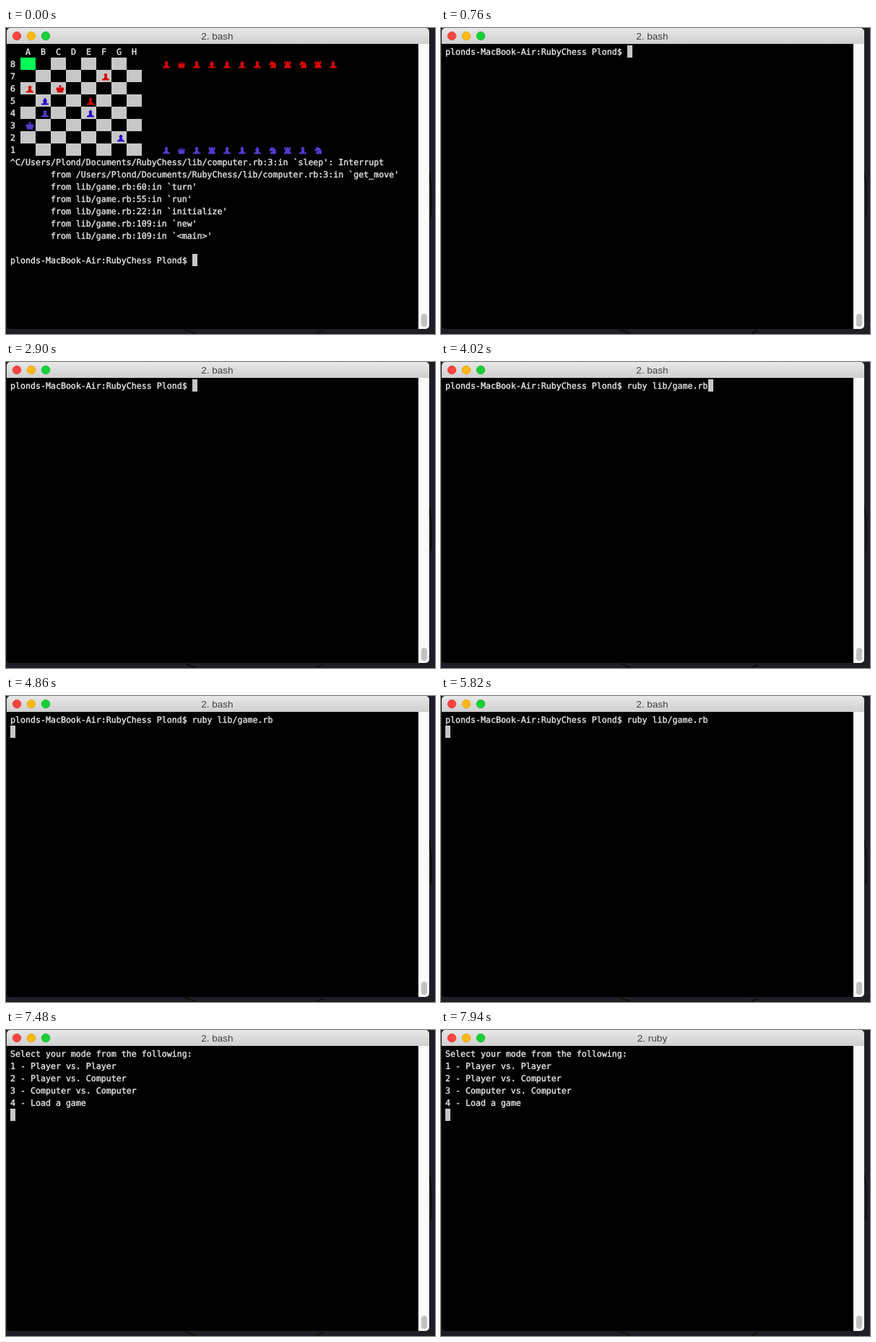
These frames come from a looping animation (594x424 px, 8 s). An HTML page:

```html
<!DOCTYPE html>
<html lang="en">
<head>
<meta charset="utf-8">
<title>Terminal chess</title>
<style>
html, body { margin: 0; width: 100%; height: 100%; overflow: hidden; background: #1e1e24; }
svg { display: block; }
#screen text {
  font: 11.627px "DejaVu Sans Mono", monospace;
  white-space: pre; text-rendering: geometricPrecision;
  fill: #e4e4e4; stroke: #e4e4e4; stroke-width: .4px;
}
#title { font: 13.5px "Liberation Sans", Arial, sans-serif; text-anchor: middle; fill: #404040; }
</style>
</head>
<body>
<svg width="594" height="424" viewBox="0 0 594 424">
  <defs>
    <linearGradient id="bar" x2="0" y2="1">
      <stop stop-color="#e8e8e8"/><stop offset="1" stop-color="#cfcfcf"/>
    </linearGradient>
    <clipPath id="frame"><rect x="1" y="0" width="585" height="417" rx="5"/></clipPath>
  </defs>
  <rect width="594" height="424" fill="#1e1e24"/>
  <path d="M586 200q5 30 2 62M248 418l14 5M430 423l9-4" fill="none" stroke="#000"/>
  <g clip-path="url(#frame)">
    <rect width="594" height="424"/>
    <rect width="594" height="22" fill="url(#bar)"/>
    <rect x="571" y="22" width="15" height="395" fill="#fafafa"/>
    <rect x="575" y="396" width="8" height="18" rx="4" fill="#c1c1c1"/>
  </g>
  <g stroke-width=".7">
    <circle cx="15" cy="11" r="5.8" fill="#fc4540" stroke="#dc3430"/>
    <circle cx="35" cy="11" r="5.8" fill="#ffb914" stroke="#dc9c0c"/>
    <circle cx="55" cy="11" r="5.8" fill="#16d136" stroke="#12ac2c"/>
  </g>
  <text id="title" x="292.5" y="16"></text>
  <g id="screen"></g>
</svg>
<script>
const screen = document.getElementById('screen');
const title = document.getElementById('title');
const LIGHT = '#c7c7c7', RED = '#d80808', BLUE = '#2408cc', VIOLET = '#5539d0';
const CELL = 7, ROW = 17;
const colX = c => 6 + CELL * c, rowY = r => 24 + ROW * r;

// chessmen, standing on y = 0 and centred on x = 0
const shapes = {
  P: 'M-5 0V-2H-3L-1.5-5.5A2.3 2.3 0 1 1 1.5-5.5L3-2H5V0Z',
  B: 'M-5 0V-2H-2.5L-2-3.5C-4-6-1.5-8 0-10 1.5-8 4-6 2-3.5L2.5-2H5V0Z',
  R: 'M-5 0V-2H-4L-3-6H-4.5V-9.5H-2.5V-8H-1V-9.5H1V-8H2.5V-9.5H4.5V-6H3L4-2H5V0Z',
  N: 'M-3.5 0C-3.5-2-1-3 0-5L-3-3.5-5-4.5-2.5-8.5-2-10 0-9C4-8.5 5.5-5 5 0Z',
  Q: 'M-4 0V-2L-5.5-8-3-5-2.5-9-1-5 0-10 1-5 2.5-9 3-5 5.5-8 4-2V0Z',
  K: 'M-4 0V-2C-7-5-5-8-2-7L-.8-6.5V-8H-2V-9.3H-.8V-10.5H.8V-9.3H2V-8H.8V-6.5L2-7C5-8 7-5 4-2V0Z'
};

const rect = (x, y, w, fill) =>
  `<rect x="${x}" y="${y}" width="${w}" height="${ROW}" fill="${fill}"/>`;
const line = (s, r, c = 0) =>
  `<text x="${colX(c)}" y="${rowY(r) + 13}">${s.replace(/</g, '&lt;')}</text>`;
const lines = (list, r = 0) => list.map((s, i) => line(s, r + i)).join('');
const cursor = (c, r) => rect(colX(c), rowY(r), CELL, LIGHT);
const piece = (p, c, r, color) =>
  `<path d="${shapes[p]}" fill="${color}" transform="translate(${colX(c) + 6} ${rowY(r) + 14.5})"/>`;

const pieceOn = {
  F7: ['P', RED], A6: ['P', RED], C6: ['K', RED], E5: ['P', RED],
  B5: ['B', BLUE], B4: ['P', VIOLET], E4: ['P', BLUE],
  A3: ['K', VIOLET], G2: ['P', BLUE]
};

function board() {
  let out = '';
  for (let r = 0; r < 8; r++) {
    out += line(String(8 - r), r + 1);
    for (let f = 0; f < 8; f++) {
      const name = 'ABCDEFGH'[f], col = 3 + 3 * f;
      if (!r) out += line(name, 0, col);
      if ((r + f) % 2 == 0)
        out += rect(20 + 21 * f, rowY(r + 1), 21, r + f ? LIGHT : '#00fb55');
      const p = pieceOn[name + (8 - r)];
      if (p) out += piece(p[0], col, r + 1, p[1]);
    }
  }
  const taken = (set, r, color) =>
    [...set].map((p, i) => piece(p, 30 + 3 * i, r, color)).join('');
  return out + taken('PQPBPBPNRNRP', 1, RED) + taken('PQPRPPBNRPN', 8, VIOLET);
}

const prompt = 'plonds-MacBook-Air:RubyChess Plond$ ';
const command = prompt + 'ruby lib/game.rb';
const from = s => '        from ' + s;
const trace = [
  "^C/Users/Plond/Documents/RubyChess/lib/computer.rb:3:in `sleep': Interrupt",
  from("/Users/Plond/Documents/RubyChess/lib/computer.rb:3:in `get_move'"),
  from("lib/game.rb:60:in `turn'"),
  from("lib/game.rb:55:in `run'"),
  from("lib/game.rb:22:in `initialize'"),
  from("lib/game.rb:109:in `new'"),
  from("lib/game.rb:109:in `<main>'"),
  '',
  prompt
];
const menu = lines([
  'Select your mode from the following:',
  '1 - Player vs. Player',
  '2 - Player vs. Computer',
  '3 - Computer vs. Computer',
  '4 - Load a game'
]) + cursor(0, 5);

// start time, screen content, running program
const scenes = [
  [0, board() + lines(trace, 9) + cursor(prompt.length, 17), 'bash'],
  [170, line(prompt, 0) + cursor(prompt.length, 0), 'bash'],
  [3880, line(command, 0) + cursor(command.length, 0), 'bash'],
  [4820, line(command, 0) + cursor(0, 1), 'bash'],
  [6040, menu, 'bash'],
  [7740, menu, 'ruby']
];

let shown;
function draw() {
  const t = performance.now() % 8000;
  const scene = scenes.findLast(s => s[0] <= t);
  if (scene != shown) {
    shown = scene;
    screen.innerHTML = scene[1];
    title.textContent = '2. ' + scene[2];
  }
  requestAnimationFrame(draw);
}
draw();
</script>
</body>
</html>
```
